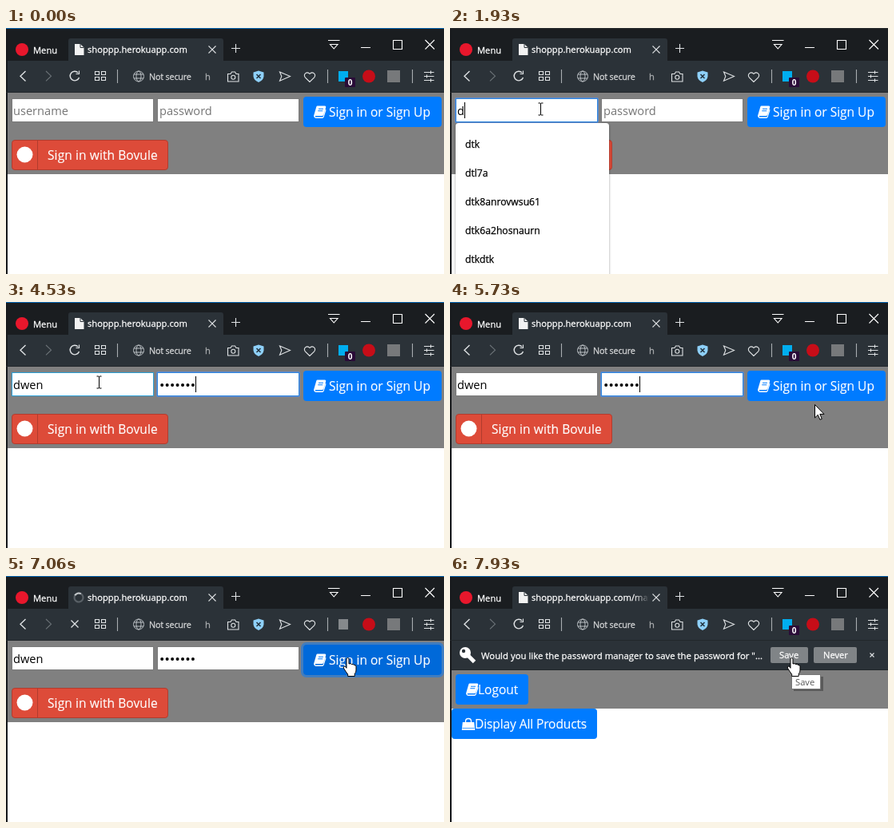
Animation of 548x308 px, one loop 8 s. Source, as an HTML page:

```html
<!DOCTYPE html>
<html lang="en">
<head>
<meta charset="utf-8">
<title>Sign in</title>
<style>
html, body { margin: 0; width: 100%; height: 100%; overflow: hidden; background: #fff; }
svg { display: block; width: 548px; height: 308px; }
text { font-family: "Open Sans", "Noto Sans", sans-serif; white-space: pre; }
.ui { font-size: 11.2px; fill: #fff; stroke: #fff; stroke-width: .28; }
.btn { font-size: 15.5px; fill: #fff; stroke: #fff; stroke-width: .15; }
.field { font-size: 14.6px; }
.hint { fill: #757575; }
.list { font-size: 12.2px; fill: #000; stroke: #000; stroke-width: .25; }
.ln { fill: none; stroke: #dfe2e4; stroke-width: 1.1; }
</style>
</head>
<body>
<svg viewBox="0 0 548 308">
  <defs>
    <clipPath id="view"><rect x="2" y="81" width="546" height="227"/></clipPath>
    <linearGradient id="fade" gradientUnits="userSpaceOnUse" x1="228" x2="249">
      <stop stop-color="#fff"/><stop offset="1" stop-color="#fff" stop-opacity="0"/>
    </linearGradient>
    <filter id="shade" x="-20%" y="-20%" width="140%" height="140%">
      <feDropShadow dx="0" dy="1" stdDeviation="1.5" flood-opacity=".4"/>
    </filter>
    <g id="book">
      <path d="M4.6 0H14q1.6.2 1.2 1.8l-2.9 9.4q-.5 1.4-2 1.4H2.6q-1.1 0-.8 1 .2.5 1 .5h8q.8 0 1.1-.8L14.7 4q1 .6.6 1.9l-2.6 8.2q-.5 1.4-2 1.4H2.8Q.5 15.4.1 13 0 12.200.3 11.5l3-10.200Q3.6.1 4.6 0z" fill="#fff"/>
      <path d="M6 3.8h6M5.3 6.300h6" fill="none" stroke="#007bff" stroke-width="1.1"/>
    </g>
  </defs>

  <rect width="548" height="308" fill="#fff"/>

  <g clip-path="url(#view)">
    <g id="login">
      <rect x="2" y="81" width="546" height="102" fill="#808080"/>
      <rect id="user" x="7.5" y="88.5" width="177" height="29" fill="#fff"/>
      <rect id="pass" x="189.5" y="88.5" width="177" height="29" fill="#fff"/>
      <rect id="glow" y="87.5" width="179" height="31" rx="1" fill="none" stroke="#4d90fe" stroke-opacity=".6"/>
      <text id="userHint" class="field hint" x="9" y="109">username</text>
      <text id="name" class="field" x="9" y="109"></text>
      <text id="passHint" class="field hint" x="192" y="109">password</text>
      <g id="dots"></g>
      <rect id="caret" y="93" width="1" height="20"/>
      <rect id="ring" x="370.5" y="84.5" width="176" height="41" rx="5.5" fill="none" stroke="#007bff" stroke-opacity=".5" stroke-width="3"/>
      <rect id="sign" x="372" y="86" width="173" height="38" rx="4"/>
      <use href="#book" x="385" y="97.5"/>
      <text class="btn" x="404" y="111">Sign in or Sign Up</text>
      <rect id="social" x="7.5" y="140.5" width="195" height="37" rx="3.5" stroke="#b13c2e"/>
      <path d="M39.5 141v36" stroke="#b13c2e"/>
      <circle cx="23.5" cy="158.5" r="10" fill="#fff"/>
      <text class="btn" x="52" y="165" letter-spacing=".1">Sign in with Bovule</text>
    </g>

    <g id="home">
      <rect x="2" y="81" width="546" height="48" fill="#808080"/>
      <rect x="7" y="86" width="91" height="38" rx="4" fill="#007bff"/>
      <use href="#book" x="20" y="97.5"/>
      <text class="btn" x="35" y="111">Logout</text>
      <rect x="2" y="129" width="182" height="38" rx="4" fill="#007bff"/>
      <path d="M15.8 146h14.4l1 10h-16.4z" fill="#fff"/>
      <path d="M19.5 149v-4q0-3.5 3.5-3.5t3.5 3.5v4" fill="none" stroke="#fff" stroke-width="1.3"/>
      <path d="M15.5 153.5h15" stroke="#007bff" stroke-width=".7"/>
      <text class="btn" x="31" y="154" letter-spacing="-.1">Display All Products</text>
    </g>

    <g id="bar">
      <rect x="2" y="81" width="546" height="37" fill="#2b3238"/>
      <path d="M2 117.5h546" stroke="#22272b"/>
      <path d="M20 97l10.500 10.500" stroke="#fff" stroke-width="5"/>
      <circle cx="19" cy="96" r="7" fill="#fff"/>
      <circle cx="17" cy="94" r="2.2" fill="#2b3238"/>
      <text class="ui" x="39" y="104" style="font-size:11.37px">Would you like the password manager to save the password for "...</text>
      <rect x="401" y="89" width="47" height="20" rx="2" fill="#808487"/>
      <rect x="455" y="89" width="54" height="20" rx="2" fill="#808487"/>
      <text class="ui" x="412" y="103">Save</text>
      <text class="ui" x="467" y="103">Never</text>
      <path class="ln" d="M525.5 96.5l5 5m0-5l-5 5"/>
    </g>
  </g>

  <g id="popup">
    <path d="M7 312V123q0-4 4-4h184q4 0 4 4v189z" fill="#fff" filter="url(#shade)"/>
  </g>

  <rect width="548" height="42" fill="#1a1d20"/>
  <rect y="41" width="548" height="40" fill="#2b3238"/>
  <rect width="2" height="308" fill="#17191c"/>
  <path d="M0 80.5h548" stroke="#22272b"/>
  <path d="M78 42V16q0-3 3-3h188q3 0 3 3v26z" fill="#2b3238"/>
  <rect id="edge" width="548" height="1"/>
  <circle cx="20" cy="27" r="8" fill="#e8172c"/>
  <text class="ui" x="34" y="31.5">Menu</text>
  <g id="page">
    <path d="M86 20h7l4.5 4.5V34H86z" fill="#f2f2f2"/>
    <path d="M93 20v4.5h4.5" fill="none" stroke="#2b3238"/>
  </g>
  <g id="spin" fill="none" stroke-width="2.2">
    <circle cx="91" cy="27" r="5.5" stroke="#596066"/>
    <path d="M91 21.5a5.5 5.5 0 0 1 5.5 5.5" stroke="#c3c7ca"/>
  </g>
  <text id="title" class="ui" x="102" y="31"></text>

  <g class="ln">
    <path d="M253.5 22.5l9 9m0-9l-9 9M282 25.5h11M287.500 20v11"/>
    <g stroke="#fff">
      <path d="M403 15.5h14.5M405.500 20.5h9.500l-4.750 5.500z"/>
      <path d="M444 24.5h12M484.5 15.5h11v11h-11zM524.5 15l11.500 11.500m0-11.500l-11.500 11.500"/>
    </g>
    <path d="M24.5 54l-6.500 6.200 6.500 6.200" stroke-width="1.4"/>
    <path d="M50 54l6.500 6.200-6.500 6.200" stroke="#6c7378"/>
    <g id="reload"><path d="M91.500 62a5.800 5.800 0 1 1-1.300-6" stroke-width="1.4"/><path d="M91.5 53.5v4h-4"/></g>
    <path id="stop" d="M81.5 55.5l9 9m0-9l-9 9" stroke-width="1.3"/>
    <path d="M111.5 54.5h5v4h-5zM119.5 54.5h5v4h-5zM111.5 61.5h5v4h-5zM119.5 61.5h5v4h-5z"/>
    <path d="M139.5 52v17M402.5 52v17M508.5 52v17" stroke="#a8adb0"/>
    <g stroke="#b9bec2" stroke-width="1"><circle cx="166" cy="60.5" r="6.5"/><ellipse cx="166" cy="60.5" rx="3" ry="6.5"/><path d="M160 58h12M160 63h12"/></g>
    <path d="M277.5 57.5h3.500l1.500-2.500h4l1.500 2.500h3v9.500h-13.500z"/><circle cx="284.3" cy="61.8" r="2.5"/>
    <path d="M342.5 55l13 5.500-13 5.700 2.300-5.700z"/>
    <path d="M380 67.5l-5.700-5.700c-2.700-3.600 2.200-8.600 5.700-4.300 3.500-4.300 8.400.7 5.700 4.300z"/>
    <path d="M523 55.5h12.5M523 60.5h12.5M523 65.5h12.5M531.5 53.5v4M526.5 58.5v4M531.5 63.5v4"/>
  </g>
  <text class="ui" x="179" y="65" opacity=".8" style="font-size:10.8px" letter-spacing="-.18">Not secure</text>
  <text class="ui" x="249" y="65" opacity=".6">h</text>
  <path d="M316 53.5l6.500 2v5q-.5 5-6.500 7.500-6-2.500-6.500-7.500v-5z" fill="#8ed0f8"/>
  <path d="M313.5 58l5 5m0-5l-5 5" stroke="#23333f" stroke-width="1.5"/>
  <rect id="addon" x="416" y="54" width="12" height="13"/>
  <g id="badge">
    <rect x="424" y="62" width="13" height="12" rx="1" fill="#2a0c38"/>
    <text x="430.5" y="72" text-anchor="middle" font-size="10" font-weight="700" fill="#fff">0</text>
  </g>
  <circle cx="454" cy="60.5" r="8" fill="#c70d18"/>
  <rect x="477" y="53" width="16" height="15" fill="#77797b"/>

  <g id="tip">
    <rect x="430" y="126" width="37" height="18" fill="#000" opacity=".3"/>
    <rect x="427.5" y="123.5" width="36" height="18" fill="#fff" stroke="#777"/>
    <text class="ui" x="432" y="136.5" style="fill:#575757;stroke:none">Save</text>
  </g>

  <g id="mouse" stroke="#000" fill="#fff" stroke-linejoin="round">
    <path id="arrow" d="M0 0v16.500l3.800-3.700 2.600 6 2.400-1-2.500-5.900h5.200z"/>
    <path id="hand" d="M-1.500 1q1.500-2 3 0v6.500q2.500-1.200 3.300.6 2.200-.8 3 .8 2.700-.3 2.700 1.900v4.700q0 3-1.800 4.500v3h-8.500v-2.400q-2.800-3.500-5-7.300-.9-2 .4-2.800 1.600-.4 2.900 2.300z"/>
    <path id="beam" d="M-3-7.500h2.500L0-7l.5-.5H3M0-7V7M-3 7.500h2.500L0 7l.5.500H3" fill="none"/>
  </g>
</svg>
<script>
const LOOP = 8000, STEP = 200 / 3;
const $ = id => document.getElementById(id);
const NS = "http://www.w3.org/2000/svg";
const show = (id, on) => { $(id).style.display = on ? "" : "none"; };
const set = (id, key, value) => $(id).setAttribute(key, value);
const count = (times, t) => times.filter(x => x <= t).length;
const add = (parent, tag, attrs, text = "") => {
  const el = document.createElementNS(NS, tag);
  for (const k in attrs) el.setAttribute(k, attrs[k]);
  el.textContent = text;
  return $(parent).appendChild(el);
};

const NAME = "dwen";
const USER_FOCUS = 1930, PASS_FOCUS = 3460, SUBMIT = 6660, HOME = 7130;
const nameKeys = [1930, 2060, 2130, 2200];
const passKeys = [3800, 4000, 4060, 4260, 4330, 4460, 4530];

// time, x, y
const path = [
  [1200, 100, 289], [1333, 96, 225], [1467, 104, 156], [1600, 111, 107], [1667, 113, 101],
  [3100, 113, 101], [3267, 116, 100], [4960, 116, 100], [5133, 152, 128], [5380, 152, 128],
  [5400, 214, 172], [5467, 266, 232], [5533, 320, 262], [5600, 378, 236],
  [5667, 428, 180], [5733, 456, 128], [5800, 456, 114], [5867, 448, 107],
  [6000, 430, 102], [6180, 430, 102], [6467, 427, 102], [LOOP, 427, 102]
];

["dtk", "dtl7a", "dtk8anrovwsu61", "dtk6a2hosnaurn", "dtkdtk"].forEach((s, i) =>
  add("popup", "text", { class: "list", x: 19, y: 150 + 36 * i }, s));
const dots = passKeys.map((_, i) =>
  add("dots", "circle", { cx: 195.2 + 6.45 * i, cy: 104, r: 2 }));

function mouseAt(t) {
  const i = Math.max(1, path.findIndex(p => p[0] > t));
  const a = path[i - 1], b = path[i];
  const k = (t - a[0]) / (b[0] - a[0]);
  return [a[1] + (b[1] - a[1]) * k, a[2] + (b[2] - a[2]) * k];
}

const inside = ([x, y], l, t, r, b) => x >= l && x < r && y >= t && y < b;

function drawFields(t, overUser) {
  const focus = t >= SUBMIT || t < USER_FOCUS ? "" : t < PASS_FOCUS ? "user" : "pass";
  const inUser = focus === "user";
  const border = (id, hover) =>
    set(id, "stroke", focus === id ? "#2f86dc" : hover ? "#2a9fd6" : "#7a7a7a");
  border("user", overUser);
  border("pass", false);
  show("glow", focus);
  set("glow", "x", inUser ? 6.5 : 188.5);

  const letters = count(nameKeys, t), n = count(passKeys, t);
  $("name").textContent = NAME.slice(0, letters);
  show("userHint", !letters);
  show("passHint", !n);
  dots.forEach((d, i) => { d.style.display = i < n ? "" : "none"; });

  const last = Math.max(...[PASS_FOCUS, ...nameKeys, ...passKeys].filter(x => x <= t));
  const blink = inUser ? 530 : 556;
  show("caret", focus && Math.floor((t - last) / blink) % 2 === 0);
  const textEnd = letters ? $("name").getComputedTextLength() : 0;
  set("caret", "x", Math.round(inUser ? 9 + textEnd : 192 + 6.45 * n));
}

function draw(time) {
  const t = Math.floor((time + 7) / STEP) * STEP;
  const home = t >= HOME, loading = t >= SUBMIT && !home;
  const pos = mouseAt(t);
  const overUser = !home && inside(pos, 7, 88, 185, 118);
  const overSocial = !home && inside(pos, 7, 140, 203, 178);
  const overSign = !home && inside(pos, 372, 86, 545, 124);

  show("login", !home);
  show("home", home);
  show("bar", home);
  if (home) {
    const p = Math.min(1, (t - 7100) / 230);
    const h = Math.round(37 * (1 - Math.pow(1 - p, 1.7)));
    set("home", "transform", `translate(0 ${h})`);
    set("bar", "transform", `translate(0 ${h - 37})`);
  } else {
    drawFields(t, overUser);
  }

  const popup = t >= nameKeys[0] && t < nameKeys[1];
  show("popup", popup);
  set("edge", "fill", popup ? "#2a2d30" : "#0a6ab6");
  set("sign", "fill", overSign ? "#0069d9" : "#007bff");
  set("social", "fill", overSocial ? "#c23321" : "#dd4b39");
  show("ring", loading);

  $("title").textContent = "shoppp.herokuapp.com" + (home ? "/main" : "");
  $("title").style.fill = $("title").style.stroke = home ? "url(#fade)" : "#fff";
  show("spin", loading);
  show("page", !loading);
  show("reload", !loading);
  show("stop", loading);
  show("badge", !loading);
  set("spin", "transform", `rotate(${(t - 7067) * 0.45 - 60} 91 27)`);
  set("addon", "fill", loading ? "#85898c" : "#00aef0");

  show("tip", t >= 7800);
  set("tip", "opacity", Math.min(1, Math.max(0, (t - 7733) / 200)));

  const hand = home || overSign || overSocial;
  show("mouse", t >= 1200);
  show("hand", hand);
  show("beam", overUser);
  show("arrow", !hand && !overUser);
  const [x, y] = pos.map(Math.round);
  set("mouse", "transform", `translate(${x + 0.5} ${y + 0.5})`);
}

const start = performance.now();
function tick() {
  draw((performance.now() - start) % LOOP);
  requestAnimationFrame(tick);
}
tick();
</script>
</body>
</html>
```
